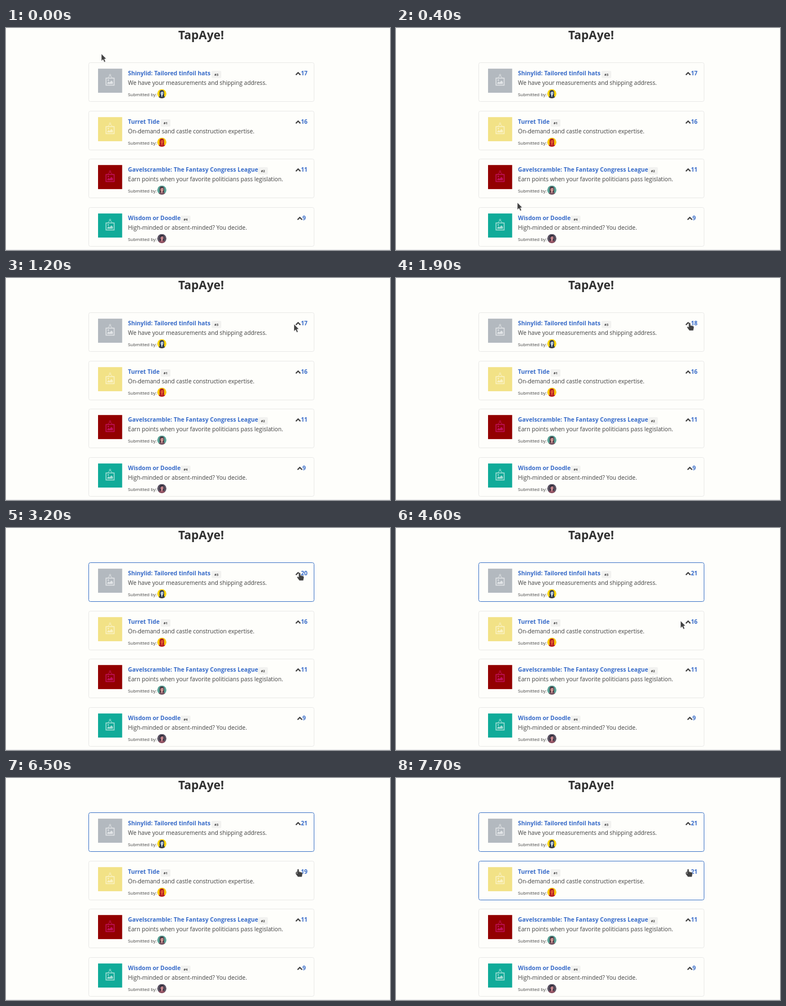
An HTML page that plays this animation: 680x394 px, repeating every 8 s.

```html
<!DOCTYPE html>
<html lang="en">
<head>
<meta charset="utf-8">
<style>
  html, body { margin: 0; width: 100%; height: 100%; overflow: hidden; background: #fefefb; }
  svg { display: block; width: 680px; height: 394px; font-family: "Open Sans", "Noto Sans", sans-serif; fill: #404040; }
  .heading { font-size: 20.9px; font-weight: 700; fill: #303030; text-anchor: middle; }
  .card { fill: none; stroke: #e9e9e7; }
  .card.popular { stroke: #3f76c8; }
  .name, .votes { font-size: 10.25px; font-weight: 700; fill: #376bc9; }
  .about { font-size: 10.2px; font-weight: 500; }
  .by { font-size: 7.9px; font-weight: 500; }
  .badge { font-size: 5.8px; font-weight: 700; }
  .votes, .badge { text-anchor: middle; }
  .line { fill: none; }
  .pointer { fill: #414141; stroke: #fff; stroke-opacity: .6; stroke-width: .6; }
</style>
</head>
<body>
<svg viewBox="0 0 680 394">
  <defs>
    <clipPath id="round"><circle r="8.2"/></clipPath>
    <g id="picture">
      <path class="line" stroke="currentColor" stroke-width="1.5"
        d="M-7.2-2.6H7.2V10H-7.2Z"/>
      <path class="line" stroke="currentColor" d="M-4-2.6L-.6-7M4-2.6L.6-7"/>
      <circle cy="-8" r="1.3" class="line" stroke="currentColor"/>
      <path fill="currentColor" d="M-5 7.8V6L-2.6 3.6-.8 5.2 2.4 1.8 5 4.4V7.8Z"/>
      <circle cx="-3.2" cy="1" r="1.3" fill="currentColor"/>
    </g>
  </defs>
  <rect width="680" height="394" fill="#fefefb"/>
  <text class="heading" x="345.5" y="20">TapAye!</text>
  <g id="list"></g>
  <path d="M0 393.5H680" stroke="#e7e7e8"/>
  <g id="cursor">
    <path id="arrow" class="pointer" d="M0 0V12.4L2.9 9.8 5 14.4 7.1 13.4 5.1 9 8.4 8.6Z"/>
    <path id="hand" class="pointer" d="M-1.7 1.2Q-1.6-.3-.2-.3T1.3 1.2V4.6L5.8 5.5Q7.8 6 7.6 8L6.5 13.8H-.5L-4.4 8.6Q-5.2 6.7-3.4 6.8L-1.7 7.8Z"/>
  </g>
</svg>
<script>
const LOOP = 8000, STEP = 100, POPULAR = 20;

const items = [
  { name: 'Shinylid: Tailored tinfoil hats', about: 'We have your measurements and shipping address.',
    tag: '#3', tagX: 372.5, fill: '#b3b9bf', icon: '#e1e4e6', votes: 17, clicks: [1900, 2600, 3200, 3900],
    avatar: ['#fbd20a', '#25304a', '#c3d5df', '#343a48'] },
  { name: 'Turret Tide', about: 'On-demand sand castle construction expertise.',
    tag: '#1', tagX: 282.5, fill: '#f2e286', icon: '#faf2c4', votes: 16, clicks: [5500, 6000, 6500, 7100, 7600],
    avatar: ['#fbc80a', '#a61b20', '#e2572f', '#b51f24'] },
  { name: 'Gavelscramble: The Fantasy Congress League', about: 'Earn points when your favorite politicians pass legislation.',
    tag: '#2', tagX: 455, fill: '#920000', icon: '#c2105c', votes: 11, clicks: [],
    avatar: ['#57a295', '#46343f', '#d79b97', '#75505e'] },
  { name: 'Wisdom or Doodle', about: 'High-minded or absent-minded? You decide.',
    tag: '#4', tagX: 318, fill: '#10ab99', icon: '#a2ded5', votes: 9, clicks: [],
    avatar: ['#5b5363', '#302d3b', '#d18b92', '#8b4b5c'] },
];

// time, x, y of the pointer tip
const path = [
  [0, 169, 46], [100, 163, 66], [200, 164, 130], [300, 178, 225], [400, 215, 310],
  [500, 270, 334], [600, 330, 250], [700, 372, 140], [800, 399, 72], [900, 459, 80],
  [1000, 487, 83], [1200, 510, 82], [1400, 520, 79.5], [4300, 520, 79.5], [4400, 514, 96],
  [4500, 506, 134], [4600, 504, 165], [4800, 510, 164], [5000, 517.5, 161.8], [LOOP, 517.5, 161.8],
];
const handTimes = [[1300, 4400], [4900, LOOP]];

const avatar = ([back, hair, face, shirt]) => `
  <g transform="translate(276 116.6)" clip-path="url(#round)">
    <circle r="8.2" fill="${back}"/>
    <path fill="${hair}" d="M-4 4V-2Q-3.8-6.4 0-6.4T4-2V4Z"/>
    <path fill="${shirt}" d="M-6.5 9Q-5.5 3.2 0 3.2T6.5 9Z"/>
    <path fill="${face}" d="M-1.2 2H1.2L.8 5.4H-.8Z"/>
    <ellipse cx=".2" cy="-1.2" rx="2.6" ry="3.6" fill="${face}"/>
    <path fill="${hair}" d="M-2.8-2Q-2.5-5.3.8-5.3L2.9-3.3Q0-4-2.8-2ZM-1.3-1.4h.8v.7h-.8ZM1-1.4h.8v.7H1Z"/>
  </g>`;

const row = (item, i) => {
  const caretX = item.votes > 9 ? 517.3 : 520.3;
  return `
  <g transform="translate(0 ${Math.round(i * 85.5)})">
    <rect class="card" x="146.5" y="61.5" width="399" height="69" rx="3"/>
    <rect x="163" y="72.2" width="42.7" height="42.7" fill="${item.fill}"/>
    <use href="#picture" x="184.3" y="91.5" color="${item.icon}"/>
    <text class="name" x="216" y="84.4">${item.name}</text>
    <rect x="${item.tagX - 8.7}" y="76" width="17.4" height="13" rx="2" fill="#f2f2f0"/>
    <text class="badge" x="${item.tagX}" y="84.7">${item.tag}</text>
    <text class="about" x="216" y="101">${item.about}</text>
    <text class="by" x="216" y="120.8">Submitted by:</text>
    ${avatar(item.avatar)}
    <path class="line" stroke="#3d3d3d" stroke-width="2" d="M${caretX - 4} 83.2l4-4 4 4"/>
    <text class="votes" x="528" y="84.4"></text>
  </g>`;
};

const find = id => document.getElementById(id);
find('list').innerHTML = items.map(row).join('');
const cards = document.querySelectorAll('.card');
const counters = document.querySelectorAll('.votes');

function pointerAt(t) {
  const next = path.findIndex(key => key[0] > t);
  const [t0, x0, y0] = path[next - 1], [t1, x1, y1] = path[next];
  const k = (t - t0) / (t1 - t0);
  return [x0 + (x1 - x0) * k, y0 + (y1 - y0) * k];
}

function draw(now) {
  const t = Math.floor(now % LOOP / STEP) * STEP;
  items.forEach((item, i) => {
    const votes = item.votes + item.clicks.filter(click => click <= t).length;
    counters[i].textContent = votes;
    cards[i].classList.toggle('popular', votes >= POPULAR);
  });
  const isHand = handTimes.some(([from, to]) => t >= from && t < to);
  find('hand').style.display = isHand ? '' : 'none';
  find('arrow').style.display = isHand ? 'none' : '';
  find('cursor').setAttribute('transform', `translate(${pointerAt(t)})`);
}

let start;
function tick(now) {
  start ??= now;
  draw(now - start);
  requestAnimationFrame(tick);
}
draw(0);
requestAnimationFrame(tick);
</script>
</body>
</html>
```
